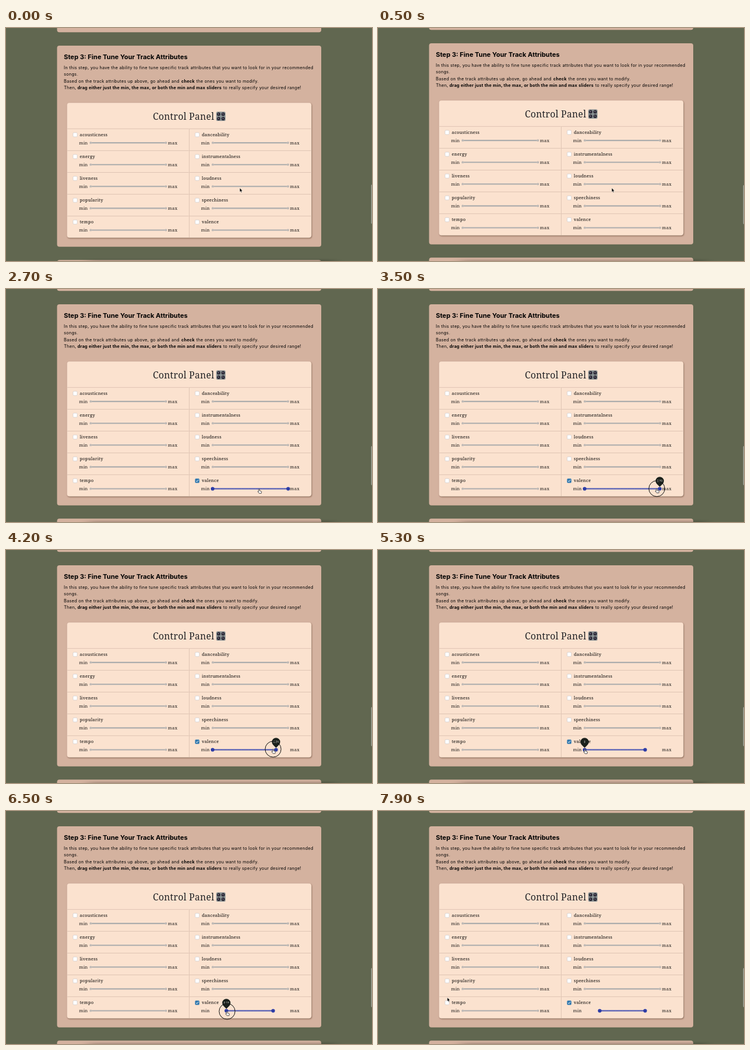
Write an HTML page that moves like this. It is 620 px wide and 396 px high and loops after 8000 ms.

```html
<!DOCTYPE html>
<html lang="en">
<head>
<meta charset="utf-8">
<title>Track attributes</title>
<style>
html, body { margin: 0; width: 100%; height: 100%; overflow: hidden; background: #616750; }
svg { display: block; width: 620px; height: 396px; }
text { white-space: pre; }
.title { font: 700 11px Inter, sans-serif; }
.body { font: 7.2px Inter, sans-serif; letter-spacing: .27px; }
.bold { font-weight: 700; }
.head { font: 15.6px "Noto Serif", serif; letter-spacing: .25px; fill: #222326; }
.label { font: 7.3px "Noto Serif", serif; letter-spacing: .3px; }
.end { fill: #1b1918; }
.value { font: 4.6px Roboto, sans-serif; fill: #d3d3cd; text-anchor: middle; }
.card { fill: #d4b29f; }
.line { stroke: #dfc4b3; fill: none; }
</style>
</head>
<body>
<svg viewBox="0 0 620 396">
  <defs>
    <filter id="blur" x="-10%" y="-200%" width="120%" height="500%">
      <feGaussianBlur stdDeviation="10 2"/>
    </filter>
    <filter id="soft" x="-5%" y="-5%" width="110%" height="112%">
      <feDropShadow dx=".8" dy="1.2" stdDeviation="1.2" flood-color="#3c2416" flood-opacity=".55"/>
    </filter>
  </defs>
  <g id="page">
    <rect class="card" x="86.5" y="-40" width="447.5" height="43.3" rx="4"/>
    <rect class="card" x="86.5" y="26" width="447.5" height="341.7" rx="4"/>
    <rect class="card" x="86.5" y="390.3" width="447.5" height="60" rx="4"/>
    <text class="title" x="98" y="49.4">Step 3: Fine Tune Your Track Attributes</text>
    <g class="body">
      <text x="98" y="66.2">In this step, you have the ability to fine tune specific track attributes that you want to look for in your recommended</text>
      <text x="98" y="77.4">songs.</text>
      <text x="98" y="88.6">Based on the track attributes up above, go ahead and</text>
      <text x="297" y="88.6" class="bold">check</text>
      <text x="322.3" y="88.6">the ones you want to modify.</text>
      <text x="98" y="99.8">Then,</text>
      <text x="121" y="99.8" class="bold">drag either just the min, the max, or both the min and max sliders</text>
      <text x="368" y="99.8">to really specify your desired range!</text>
    </g>
    <rect x="103.5" y="123.2" width="413.7" height="229" rx="4" fill="#fbe2cf" filter="url(#soft)"/>
    <text class="head" x="248.7" y="152">Control Panel</text>
    <rect x="356.2" y="138.3" width="15.6" height="15.8" rx="2.2" fill="#8a9295"/>
    <g id="knobs"></g>
    <g id="rows"></g>
    <g id="tick">
      <rect x="320.3" y="322.3" width="7.2" height="7.2" rx="1.5" fill="#2f77ad"/>
      <path d="M322 326l1.4 1.4 2.5-3" fill="none" stroke="#fff"/>
    </g>
    <g id="range">
      <path id="rail" stroke="#3444ae" stroke-width="2.2"/>
      <path id="dots" stroke="#8f94c9" stroke-width=".8" stroke-dasharray="1 1.4"/>
      <circle id="low" cy="339.5" r="3.1" fill="#2d3da6"/>
      <circle id="high" cy="339.5" r="3.1" fill="#2d3da6"/>
    </g>
    <g id="drop">
      <path d="M0 0L-4.95-4.95A7 7 0 1 1 4.95-4.95Z" fill="#1b211c"/>
      <text class="value" y="-8.3"></text>
    </g>
  </g>
  <rect x="140" y="395" width="415" height="6" opacity=".3" filter="url(#blur)"/>
  <rect id="bar" x="618.6" width="4" height="66.5" rx="1.4" fill="#a5a89c"/>
  <circle id="ring" r="13.5" fill="none" stroke="#111"/>
  <path id="arrow" d="M0 0V6.4L1.4 5.2 2.4 7.4 3.5 6.9 2.6 4.8H4.6Z" fill="#000" stroke="#fff" stroke-width=".4"/>
  <path id="hand" d="M-.3 0c.8 0 1 .4 1 1v2l2.5.7q.8.2.7 1l-.5 2.6h-3.6l-2.3-3q.2-1 1.2-.2l.2.3V1q0-1 .8-1z" fill="#fff" stroke="#111" stroke-width=".7"/>
</svg>
<script>
const $ = id => document.getElementById(id);
const LOOP = 8000, LEFT = 350, SPAN = 128;
const clamp = v => Math.min(1, Math.max(0, v));
const smooth = p => p * p * (3 - 2 * p);

const names = ["acousticness", "danceability", "energy", "instrumentalness", "liveness",
  "loudness", "popularity", "speechiness", "tempo", "valence"];

function cell(name, i) {
  const x = 103.7 + (i % 2) * 206.8, y = 167.3 + (i >> 1) * 37.1;
  const active = name === "valence";
  const knob = cx => `<circle cx="${cx}" cy="${y + 23.8}" r="1.8" fill="#b9b6b4" stroke="#d0c5bd" stroke-width=".6"/>`;
  const slider = `<g ${active ? 'id="idle"' : ""}>
    <path d="M${x + 40} ${y + 23.8}h127" stroke="#adadad" stroke-width="2.1"/>
    ${knob(x + 39.8)}${knob(x + 167.2)}</g>`;
  return `<path class="line" d="M${x} ${y}h206"/>
    <rect x="${x + 9.9}" y="${y + 6.6}" width="7" height="7" rx="1.5" fill="#fff" stroke="#c8c5c6" stroke-width=".6"/>
    <text class="label" x="${x + 21.3}" y="${y + 12.5}">${name}</text>
    <text class="label end" x="${x + 20}" y="${y + 26.5}">min</text>
    <text class="label end" x="${x + 170.6}" y="${y + 26.5}">max</text>${slider}`;
}
$("rows").innerHTML = '<path class="line" d="M310.4 167V352"/>' + names.map(cell).join("");
$("knobs").innerHTML = [360.2, 367.8].map(x => [142.4, 150].map(y =>
  `<circle cx="${x}" cy="${y}" r="2.9" fill="#25242d"/>
   <circle cx="${x}" cy="${y}" r="1.4" fill="#4b465c"/>
   <path d="M${x} ${y}l-1.4-1.5" stroke="#c9c6d0" stroke-width=".6"/>`).join("")).join("");

// Pointer stops: time, x, y, and whether the way there is eased
const stops = [
  [0, 396, 272], [1000, 396, 272], [1700, 323.5, 326, 1], [2050, 323.5, 326],
  [2650, 429, 340, 1], [2750, 429, 340], [3150, 478, 339.5, 1], [3300, 478, 339.5],
  [4200, 452.5, 338.5], [4600, 452.5, 338.5], [5200, 350.8, 338.8, 1], [5600, 350.8, 338.8],
  [6325, 373.3, 340.2], [6500, 374.5, 340.5], [6650, 375.6, 340.7], [7000, 375.6, 340.7],
  [7800, 117.4, 317, 1], [8000, 117.4, 317]
];
function pointer(t) {
  const i = Math.max(1, stops.findIndex(s => s[0] >= t));
  const [t0, x0, y0] = stops[i - 1], [t1, x1, y1, eased] = stops[i];
  const p = clamp((t - t0) / (t1 - t0)), k = eased ? smooth(p) : p;
  return [x0 + (x1 - x0) * k, y0 + (y1 - y0) * k];
}

const LAG = 175;
// A thumb trails the pointer while it is dragged
const trail = (t, from, to) => pointer(Math.min(to, Math.max(from, t - LAG)))[0];
const show = (id, on) => $(id).style.display = on ? "" : "none";
const move = (id, x, y, s = 1) => $(id).setAttribute("transform", `translate(${x} ${y}) scale(${s})`);
const within = (t, a, b) => t >= a && t < b;

function draw(t) {
  const scroll = 4 * (1 - clamp(t / 400)) ** 2;
  move("page", 0, scroll);
  $("bar").setAttribute("y", 267 - scroll / 5);

  const on = t >= 1850;
  show("tick", on);
  show("range", on);
  show("idle", !on);

  const low = t < 5600 ? LEFT : trail(t, 5600, 6650);
  const high = trail(t, 3300, 4200);
  $("low").setAttribute("cx", low);
  $("high").setAttribute("cx", high);
  for (const id of ["rail", "dots"]) $(id).setAttribute("d", `M${low} 339.5H${high}`);

  const onHigh = t < 4800;
  const [from, to] = onHigh ? [3050, 4650] : [5080, 7050];
  const size = smooth(clamp((t - from) / 150)) * smooth(clamp((to + 150 - t) / 150));
  const thumb = onHigh ? high : low;
  show("drop", size > 0);
  move("drop", thumb, 336.2, size);
  $("drop").lastElementChild.textContent = +clamp((thumb - LEFT) / SPAN).toFixed(2);

  const [x, y] = pointer(t);
  const hand = y > 334 && x > 345;
  show("hand", hand);
  show("arrow", !hand);
  move(hand ? "hand" : "arrow", x, y);
  show("ring", within(t, 1800, 1950) || within(t, 3250, 4450) || within(t, 5550, 6850));
  move("ring", x, y);
}

function frame() {
  draw(performance.now() % LOOP);
  requestAnimationFrame(frame);
}
frame();
</script>
</body>
</html>
```
